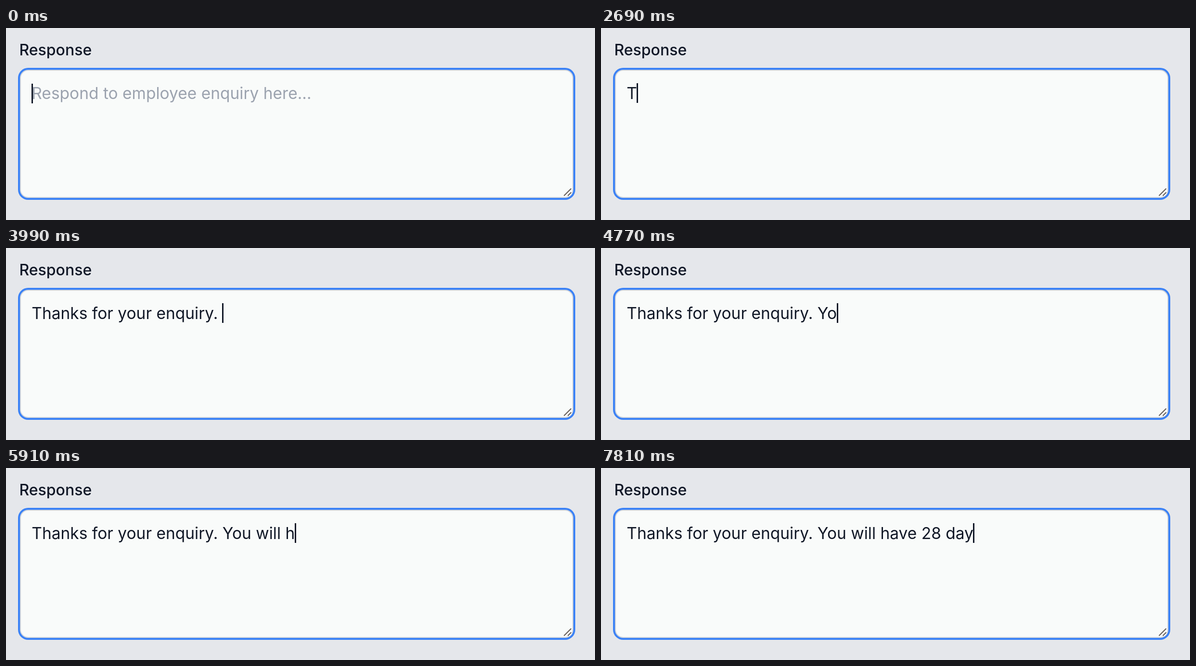
An HTML page with a canvas that plays this animation: 1224 by 400 pixels, repeating every 8000 ms.

```html
<!DOCTYPE html>
<html lang="en">
<head>
<meta charset="utf-8">
<title>Response form</title>
<style>
  html, body { margin: 0; width: 100%; height: 100%; overflow: hidden; background: #e5e7eb; }
  canvas { display: block; }
</style>
</head>
<body>
<canvas id="stage" width="1224" height="400"></canvas>
<script>
const ctx = document.getElementById('stage').getContext('2d');
const LOOP = 8000;
const INK = '#111827';
const FONT = 'Inter, "Noto Sans", sans-serif';
const TEXT_FONT = `400 33.5px ${FONT}`;
const LABEL_FONT = `500 32px ${FONT}`;
const TEXT_X = 53.3;
const BASELINE = 148;

const placeholder = 'Respond to employee enquiry here...';
const message = 'Thanks for your enquiry. You will have 28 day';

// The sentence grows by one character per key, except for one jump to its full stop.
const firstWord = [2690, 2850, 2930, 3010, 3100, 3180];
const jumpTime = 3350;
const jumpLength = message.indexOf('.') + 1;
const laterKeys = [
  3990, 4590, 4770, 4840, 5000, 5330, 5400, 5570, 5650, 5730, 5910,
  5940, 6120, 6190, 6260, 6560, 6730, 6980, 7440, 7640, 7810
];
const caretOff = [[170, 680], [1170, 1720], [2240, 2690], [3860, 3990], [4520, 4590]];

const countPast = (times, t) => times.filter(time => time <= t).length;

function typedLength(t) {
  return t < jumpTime ? countPast(firstWord, t) : jumpLength + countPast(laterKeys, t);
}

function fillBox(x, y, w, h, radius, color) {
  ctx.fillStyle = color;
  ctx.beginPath();
  ctx.roundRect(x, y, w, h, radius);
  ctx.fill();
}

function drawText(text, x, y, font, color) {
  ctx.font = font;
  ctx.fillStyle = color;
  ctx.fillText(text, x, y);
}

function drawLine(x1, y1, x2, y2, color, width) {
  ctx.strokeStyle = color;
  ctx.lineWidth = width;
  ctx.beginPath();
  ctx.moveTo(x1, y1);
  ctx.lineTo(x2, y2);
  ctx.stroke();
}

function drawGrip() {
  drawLine(1161, 350.5, 1175.5, 336, '#ffffff', 2);
  drawLine(1169.5, 350.5, 1175.5, 344.5, '#ffffff', 2);
  drawLine(1159.5, 349.5, 1174.5, 334.5, '#635b55', 2.2);
  drawLine(1167.5, 349.5, 1174.5, 342.5, '#635b55', 2.2);
}

function drawField() {
  ctx.fillStyle = '#e5e7eb';
  ctx.fillRect(0, 0, 1224, 400);
  drawText('Response', 27.5, 57, LABEL_FONT, INK);
  fillBox(25, 83, 1158, 275, 21, '#3b82f6');
  fillBox(29, 87, 1150, 267, 17, '#d1d5db');
  fillBox(31, 89, 1146, 263, 15, '#f9fbfa');
  drawGrip();
}

function draw(t) {
  drawField();
  const typed = message.slice(0, typedLength(t));
  drawText(typed || placeholder, TEXT_X, BASELINE, TEXT_FONT, typed ? INK : '#9ca3af');
  if (caretOff.some(([from, to]) => t >= from && t < to)) return;
  const caretX = Math.floor(TEXT_X + ctx.measureText(typed).width);
  ctx.fillStyle = INK;
  ctx.fillRect(caretX, typed ? 115 : 116, 3, 41);
}

const start = performance.now();
function tick() {
  draw((performance.now() - start) % LOOP);
  requestAnimationFrame(tick);
}
tick();
</script>
</body>
</html>
```
